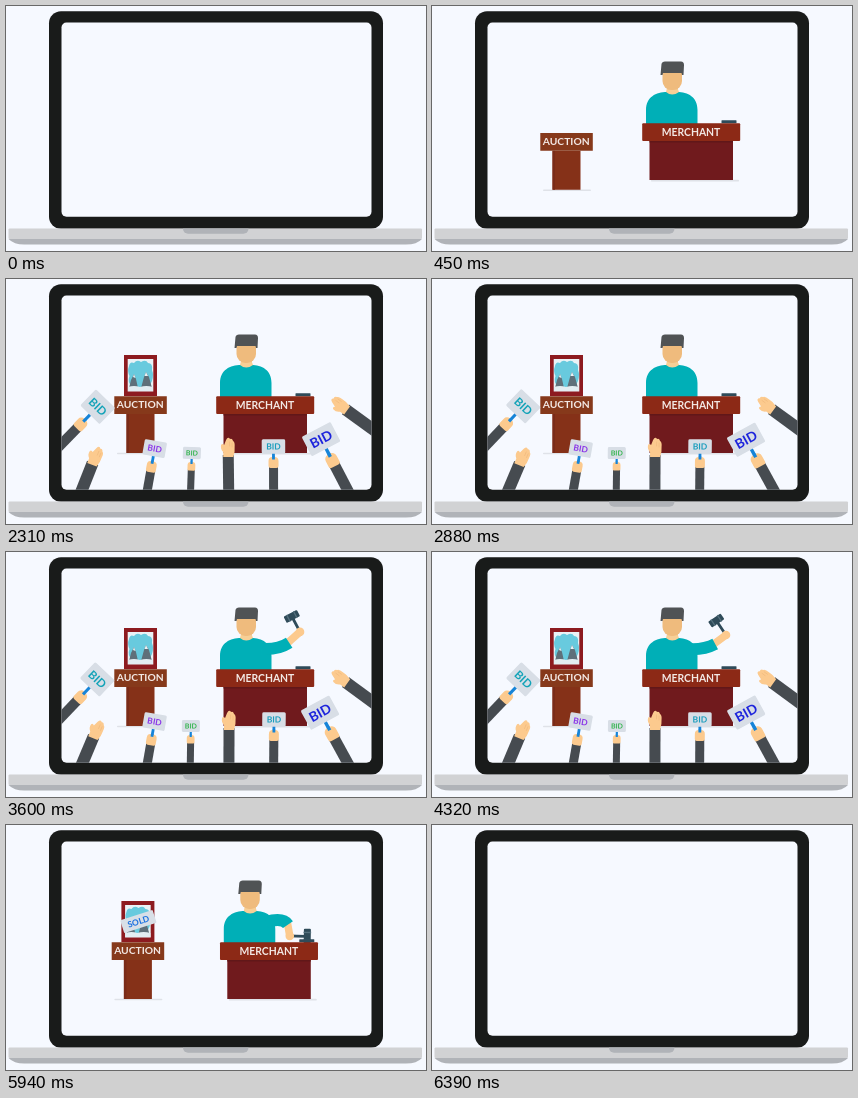
An HTML page with a canvas for the animation above (6.48 s loop, 420x245 px).

```html
<!DOCTYPE html>
<html lang="en">
<head>
<meta charset="utf-8">
<title>Online auction</title>
<style>
html, body { margin: 0; width: 100%; height: 100%; overflow: hidden; background: #f6f9ff; }
canvas { display: block; }
</style>
</head>
<body>
<canvas id="stage" width="420" height="245"></canvas>
<script>
const c = document.getElementById('stage').getContext('2d');
const LOOP = 6480, BG = '#f6f9ff', SKIN = '#fcca8e', TEAL = '#00afb7', SLATE = '#2f4b59', SLEEVE = '#464b50';

const prog = (t, start, dur) => Math.min(1, Math.max(0, (t - start) / dur));
const easeOut = p => 1 - (1 - p) ** 3;
const easeIn = p => p * p;
const mix = (a, b, p) => a + (b - a) * p;

function box(x, y, w, h, color, r = 0) {
  c.fillStyle = color;
  c.beginPath();
  c.roundRect(x, y, w, h, r);
  c.fill();
}
function shape(d, color) {
  c.fillStyle = color;
  c.fill(new Path2D(d));
}
function line(d, color, width, cap = 'round') {
  c.strokeStyle = color;
  c.lineWidth = width;
  c.lineCap = cap;
  c.stroke(new Path2D(d));
}
function label(s, x, y, size, color) {
  c.font = `bold ${size}px Lato, sans-serif`;
  c.textAlign = 'center';
  c.textBaseline = 'alphabetic';
  c.fillStyle = color;
  c.fillText(s, x, y);
}
function at(x, y, deg, draw) {
  c.save();
  c.translate(x, y);
  c.rotate(deg * Math.PI / 180);
  draw();
  c.restore();
}

// Sign holders: x, y = sign centre; bare hands: x, y = wrist. Each moves along its own axis.
const arms = [
  { x: 91, y: 127, rot: 43, w: 27, h: 22.5, size: 11.5, color: '#14a3b8', stem: 23, sleeve: 10, dist: 85, enter: 1250, leave: 5300 },
  { x: 87, y: 184, rot: 22, sleeve: 12, dist: 55, enter: 1300, leave: 5350 },
  { x: 149.5, y: 169.7, rot: 11, w: 22.5, h: 15.5, size: 8.5, color: '#8a35e8', stem: 17.5, sleeve: 9, dist: 56, enter: 1330, leave: 5270 },
  { x: 185, y: 174, rot: 1, w: 18, h: 12, size: 7, color: '#35b550', stem: 12.5, sleeve: 7, dist: 48, enter: 1610, leave: 5260 },
  { x: 222, y: 176, rot: -1, sleeve: 11, dist: 58, enter: 1270, leave: 5380 },
  { x: 268.5, y: 167.5, rot: 1, w: 23.5, h: 14.5, size: 8.5, color: '#1b9dbd', stem: 15, sleeve: 9, dist: 58, enter: 1290, leave: 5330 },
  { x: 314.7, y: 160.3, rot: -28, w: 32.5, h: 22, size: 13.5, color: '#1d24dc', stem: 22.5, sleeve: 11, dist: 85, enter: 1725, leave: 4944 },
  { x: 339, y: 131, rot: -55, sleeve: 12, dist: 60, enter: 1540, leave: 5055 },
];

function signArm(a) {
  const s = a.sleeve / 9;
  box(-a.sleeve / 2, a.stem + 5 * s, a.sleeve, 80, SLEEVE);
  box(-1.4 * s, a.h / 2 - 2, 2.8 * s, a.stem - a.h / 2 + 2, '#1684d8');
  box(-5 * s, a.stem - 4.5 * s, 10 * s, 11 * s, SKIN, [4 * s, 4 * s, 2 * s, 2 * s]);
  box(-1.4 * s, a.stem - 5 * s, 2.8 * s, 3 * s, '#1684d8');
  box(-a.w / 2, -a.h / 2, a.w, a.h, '#d8dee6', 1.5);
  label('BID', 0, a.size * .36, a.size, a.color);
}

function bareArm(a) {
  box(-a.sleeve / 2, 0, a.sleeve, 80, SLEEVE);
  shape('M-5 2 L-5 -3 Q-8 -6 -7 -10 Q-6 -12 -4 -10 L-2 -15 Q0 -19 2 -16 Q4 -17 5 -14 Q7 -13 6.5 -8 Q7 -4 5 2Z', SKIN);
  line('M1.5 -13 V-9 M4 -12 V-8', '#efb87c', .6);
}

function drawArms(t) {
  arms.forEach((a, i) => {
    const out = 1 - easeOut(prog(t, a.enter, 450)) + easeIn(prog(t, a.leave, 450));
    if (out >= 1) return;
    const sway = 1.2 * Math.sin(t / 710 * 2 * Math.PI + i * 1.9);
    at(a.x, a.y, a.rot, () => {
      c.translate(0, a.dist * out + 50);
      c.rotate(sway * Math.PI / 180);
      c.translate(0, -50);
      a.w ? signArm(a) : bareArm(a);
    });
  });
}

function painting() {
  box(118, 76, 33, 41, '#8d1b20');
  box(121.7, 80, 25.6, 32.5, '#eaf2f6');
  shape('M123 87 Q124 82 128 84 Q131 80 135 83 Q140 80 142 84 Q147 84 146 91 Q148 96 146 102 L143 108 H126 Q121 103 123.5 97 Q121 92 123 87Z', '#68cade');
  shape('M123 109 L125 101 L128 95 L130 100 L132 109Z M135 109 L138 98 L140 93 L143 98 L146 109Z', '#5f707a');
  shape('M127 98 L128 95 L129.5 99Z M138.5 97 L140 93 L142 97Z', '#eaf2f6');
  shape('M122 112 V108 Q128 106 134 108 Q140 106 147 108 V112Z', '#e3edf2');
}

function soldSign(t) {
  const p = easeOut(prog(t, 4590, 150));
  if (p <= 0) return;
  at(135, 96.5, -18, () => {
    c.scale(p, p);
    box(-17, -6.7, 34, 13.4, '#d8dfe7', 1);
    label('SOLD', 0, 3, 8.5, '#176fe0');
  });
}

function lectern(t) {
  const rise = prog(t, 710, 220);
  if (rise > 0) {
    c.save();
    c.beginPath();
    c.rect(100, 60, 70, 57);
    c.clip();
    c.translate(0, 41 * (1 - easeOut(rise)));
    painting();
    c.restore();
  }
  box(111, 173.7, 48, 1.5, '#dfe2e8', 1);
  box(120.5, 135, 28, 39, '#853118');
  box(120.5, 135, 2.5, 39, '#7a2b18');
  box(108.3, 117.3, 52.5, 17.7, '#86391b');
  label('AUCTION', 134.2, 129.3, 10.3, '#f3e9e5');
  soldSign(t);
}

// Hammer arm poses: elbow x, y, hand x, y, hammer angle
const HIDDEN = [264, 112, 270, 136, 90];
const RAISED = [276, 98, 294, 83, -34];
const STRUCK = [277, 92, 280, 111, 91];

function hammerArm(t) {
  if (t < 2950) return;
  const up = easeOut(prog(t, 2950, 500)), down = easeIn(prog(t, 4360, 180));
  const [ex, ey, hx, hy, turn] = HIDDEN.map((v, i) => mix(mix(v, RAISED[i], up), STRUCK[i], down));
  const swing = 7 * Math.sin((t - 3450) / 435 * Math.PI) * prog(t, 3450, 100) * (1 - down);
  const y = hy - Math.abs(swing) * .5;
  at(hx, y, turn + swing, () => {
    box(-1.4, -17, 2.8, 20, SLATE, 1);
    box(-7.5, -21, 15, 7, SLATE, 1);
    box(-4.5, -21.3, 1.3, 7.6, '#55717e');
    box(3.2, -21.3, 1.3, 7.6, '#55717e');
  });
  line(`M${mix(ex, hx, .1)} ${mix(ey, y, .2)} L${hx} ${y}`, SKIN, 7.5);
  line(`M256 97 Q${ex - 4} ${ey} ${mix(ex, hx, .4)} ${mix(ey, y, .4)}`, TEAL, 12, 'butt');
  c.fillStyle = SKIN;
  c.beginPath();
  c.arc(hx, y, 4.3, 0, 7);
  c.fill();
}

function merchant(t) {
  box(235, 78, 11, 13, '#e3ab70', 3);
  shape('M214 118 V104 C214 91 224 86 235 86 Q240 89 245 86 C256 86 265.5 91 265.5 104 V118Z', TEAL);
  shape('M234 86 Q240 91 247 86 L245.5 82 H235Z', '#f7cf96');
  box(230.5, 60, 19.5, 24, '#efbb7d', [0, 0, 9, 9]);
  shape('M228.5 69 L229.5 58 Q230 55.5 233 55.5 H249 Q252 55.5 252 59 L251.5 69 H250 L249.5 67 H231 L230.5 69Z', '#505355');
  hammerArm(t);
  box(219, 173.8, 88, 1.7, '#dfe2e8', 1);
  box(217.5, 134, 83.5, 40, '#701a1d');
  box(217.5, 135, 83.5, 1.5, '#611719');
  box(289.5, 114.2, 15, 3, SLATE, .5);
  box(210.2, 117.3, 98, 17.7, '#8c2916', 1);
  label('MERCHANT', 259, 129.8, 10.4, '#f3e9e5');
}

function laptop() {
  box(43, 5.2, 334, 217.5, '#191b1a', 12);
  box(55.5, 16.5, 310, 194.2, BG, 5);
  shape('M2.5 233 H416 Q411 238.5 400 238.5 H18 Q8 238.5 2.5 233Z', '#b0b3b8');
  box(2.5, 222.5, 413.5, 10.5, '#d1d2d4', 1);
  box(177, 222.5, 65.5, 5.3, '#b0b3b8', [0, 0, 5, 5]);
}

function frame(now) {
  const t = now % LOOP;
  c.fillStyle = BG;
  c.fillRect(0, 0, 420, 245);
  laptop();
  c.save();
  c.beginPath();
  c.roundRect(55.5, 16.5, 310, 194.2, 5);
  c.clip();
  if (t >= 90 && t < 6390) {
    const exit = easeIn(prog(t, 5860, 520));
    at(160 * exit, 160 * (1 - easeOut(prog(t, 70, 400))), 0, () => merchant(t));
    at(-110 * exit, 96 * (1 - easeOut(prog(t, 210, 450))), 0, () => lectern(t));
    drawArms(t);
  }
  c.restore();
}

let start;
function loop(now) {
  start ??= now;
  frame(now - start);
  requestAnimationFrame(loop);
}
requestAnimationFrame(loop);
</script>
</body>
</html>
```
